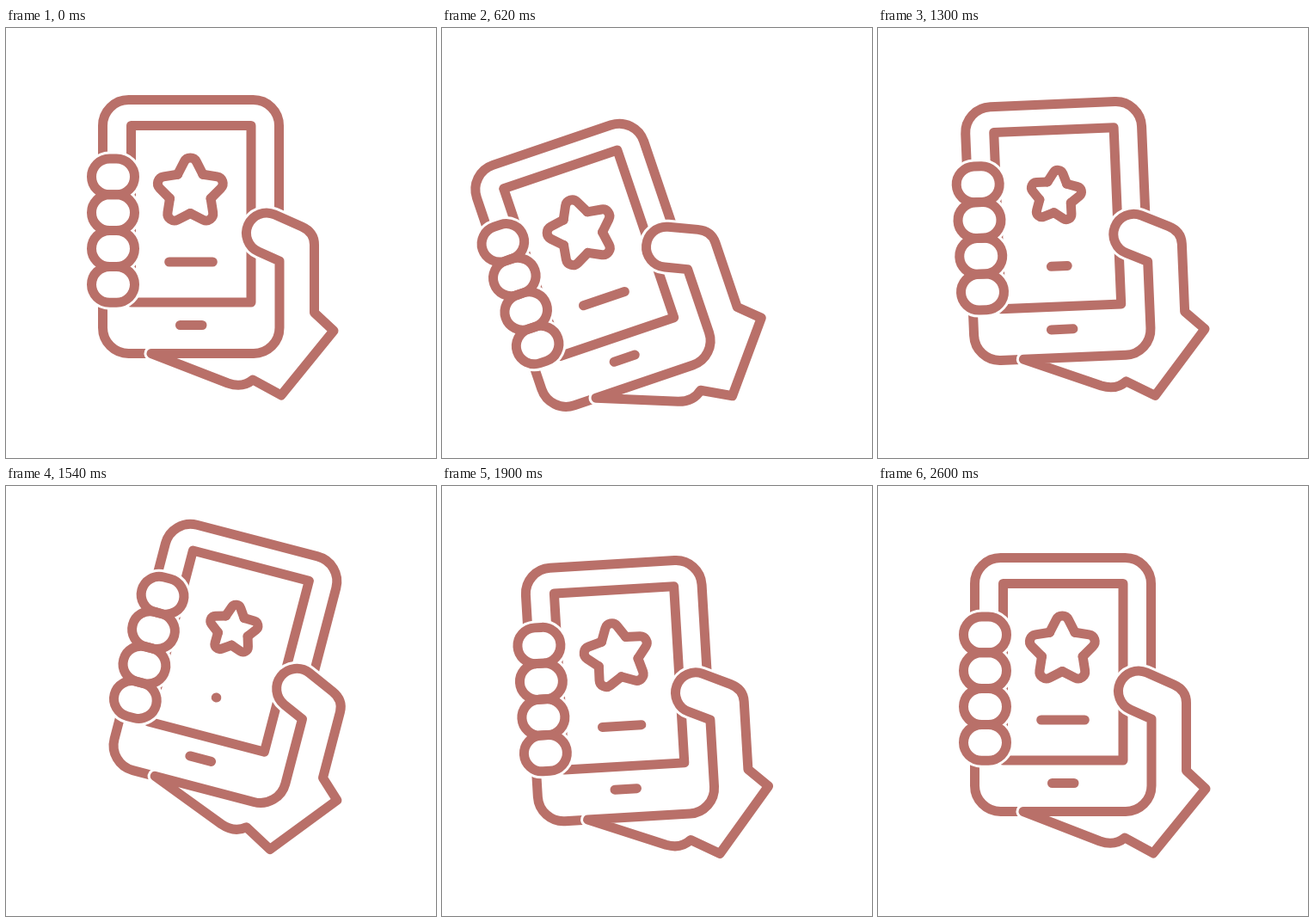
Recreate the animation shown at these times as an HTML page without scripts. Size 500 by 500 pixels, loop 2820 ms.

```html
<!DOCTYPE html>
<html lang="en">
<head>
<meta charset="utf-8">
<title>Hand shaking a phone</title>
<style>
  html, body { margin: 0; width: 100%; height: 100%; overflow: hidden; background: #fff; }
  svg {
    display: block; width: 500px; height: 500px;
    fill: none; stroke: #b97069; stroke-width: 11;
    stroke-linecap: round; stroke-linejoin: round;
  }
  .halo { stroke: #fff; stroke-width: 17; fill: #fff; }
  .butt { stroke-linecap: butt; }
  .steady { vector-effect: non-scaling-stroke; }

  .device, .star, .caption {
    animation: 2820ms cubic-bezier(.37, 0, .63, 1) infinite;
  }
  .device { transform-origin: 331px 374px; animation-name: shake; }
  .star { animation-name: spin, shrink; }
  .caption { animation-name: retract; }

  @keyframes shake {
    0% { rotate: 0deg; }
    7.09% { rotate: 0deg; animation-timing-function: cubic-bezier(0, .65, .52, 1); }
    34.75% { rotate: -21deg; }
    57.45% { rotate: 16deg; }
    70.92% { rotate: -7deg; }
    82.6% { rotate: 3deg; }
    92.2%, 100% { rotate: 0deg; }
  }
  @keyframes spin {
    0%, 34.75% { rotate: 0deg; }
    70.92%, 100% { rotate: 360deg; }
  }
  @keyframes shrink {
    0%, 34.75% { scale: 1; }
    51.06% { scale: .71; }
    70.92%, 100% { scale: 1; }
  }
  @keyframes retract {
    0%, 34.75% { scale: 1 1; }
    54.2% { scale: .01 1; }
    70.92%, 100% { scale: 1 1; }
  }
</style>
</head>
<body>
<svg viewBox="0 0 500 500">
  <defs>
    <path id="lobe" class="steady" d="M-14.7-20.2L-7.1-35.1A8 8 0 0 1 7.1-35.1L14.7-20.2"/>
    <path id="hand" d="M318 271L293.5 260A23.5 23.5 0 0 1 312.5 217L344 231Q358.5 237.5 358.5 252V331L381 352L320 427L287 409Q275 419 258 413L169 378.5H288A30 30 0 0 0 318 348.5Z"/>
    <rect id="finger" x="99.5" width="50" height="41.8" rx="21"/>
    <g id="fingers">
      <use href="#finger" y="152"/>
      <use href="#finger" y="193.8"/>
      <use href="#finger" y="235.6"/>
      <use href="#finger" y="277.4"/>
    </g>
  </defs>

  <g class="device">
    <rect x="112.5" y="83.5" width="205" height="295" rx="30"/>
    <rect x="145.5" y="113.5" width="139.5" height="205.5"/>
    <path d="M202.5 345.5H228"/>

    <g transform="translate(214.3 190.5)">
      <g class="star">
        <use href="#lobe"/>
        <use href="#lobe" transform="rotate(72)"/>
        <use href="#lobe" transform="rotate(144)"/>
        <use href="#lobe" transform="rotate(216)"/>
        <use href="#lobe" transform="rotate(288)"/>
      </g>
    </g>
    <g transform="translate(215 272)">
      <path class="caption steady" d="M-25.3 0H25.3"/>
    </g>

    <use href="#hand" class="halo"/>
    <use href="#hand"/>
    <use href="#fingers" class="halo"/>
    <use href="#fingers"/>
  </g>
</svg>
</body>
</html>
```
